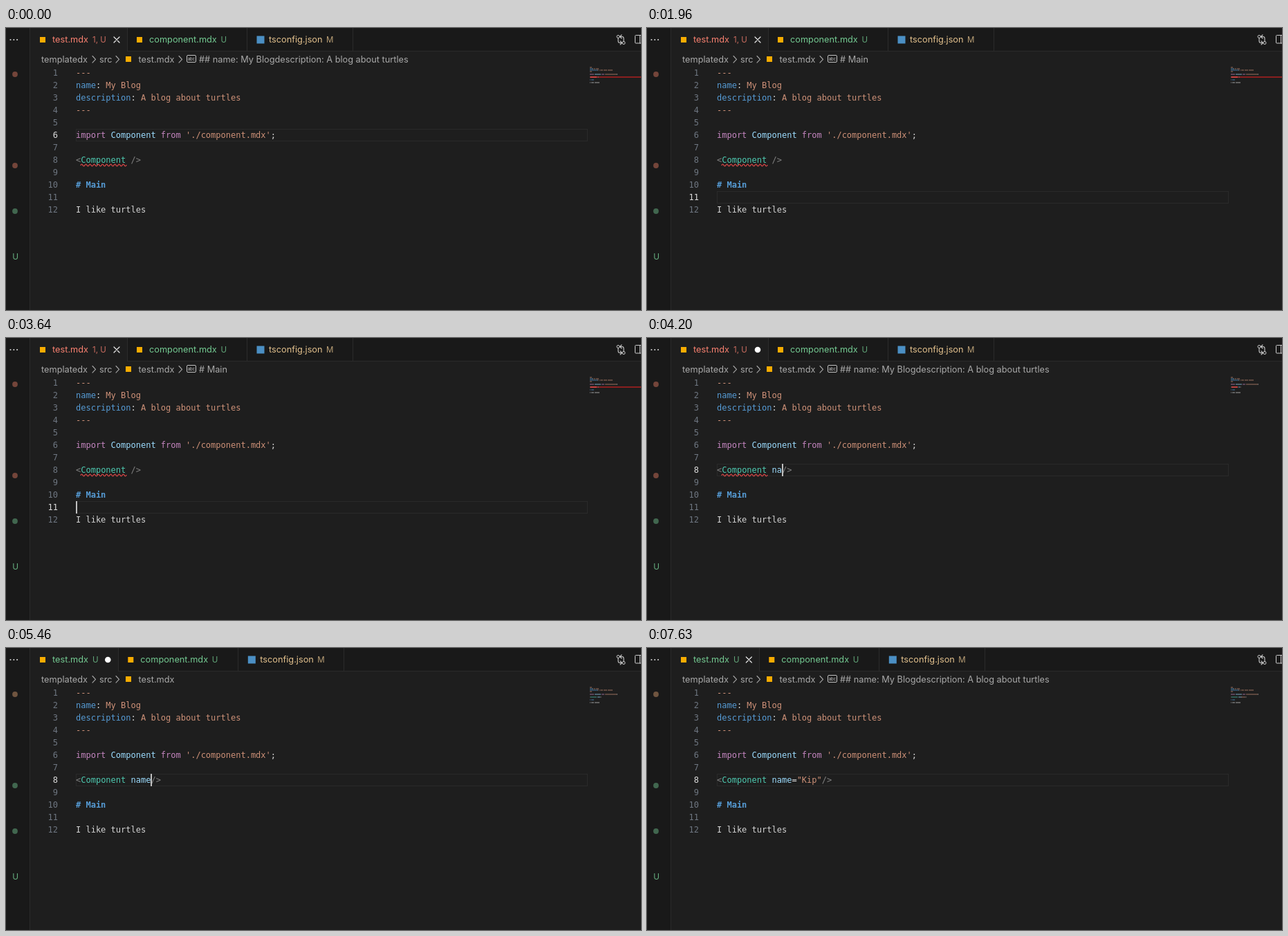
Write an HTML page that moves like this. It is 918x408 px and loops after 8000 ms.

```html
<!DOCTYPE html>
<html lang="en">
<head>
<meta charset="utf-8">
<title>Editor type checking</title>
<style>
  html, body { margin: 0; width: 100%; height: 100%; overflow: hidden; background: #1e1e1e; }
  svg { display: block; width: 918px; height: 408px; }
  text { white-space: pre; font-variant-ligatures: none; }
  .mono { font: 12px "DejaVu Sans Mono", monospace; }
  .ui { font: 12.75px Inter, sans-serif; }
  .small { font: 11.85px Inter, sans-serif; }
  .badge { font: 11.5px Inter, sans-serif; opacity: .8; }
  .line { fill: none; stroke-linecap: round; stroke-linejoin: round; }
</style>
</head>
<body>
<svg id="stage" viewBox="0 0 918 408"></svg>
<script>
const LOOP = 8000, CW = 7.224, LEFT = 101, TOP = 56, ROW = 18;
const C = {
  fg: '#d4d4d4', dim: '#808080', blue: '#569cd6', sky: '#9cdcfe', pink: '#c586c0',
  str: '#ce9178', type: '#4ec9b0', bad: '#f44747', err: '#f88070', add: '#73c991',
  mod: '#e2c08d', crumb: '#a9a9a9', link: '#4daafc', edge: '#2b2b2b', bg: '#1e1e1e', side: '#191919'
};
const FRONT = '## name: My Blogdescription: A blog about turtles';

// Each step patches the editor state at its time in ms.
const STEPS = [
  [0, { row: 6, caret: false, attr: '', mode: 'md', crumb: FRONT, errors: 1, mark: 'tag',
        dirty: false, hoverTab: false, popup: 0 }],
  [420, { row: 11, caret: true }],
  [560, { crumb: '# Main' }],
  [980, { caret: false }],
  [1050, { hoverTab: true }],
  [1470, { caret: true }],
  [1610, { hoverTab: false }],
  [1960, { caret: false }],
  [2450, { caret: true, popup: .45 }],
  [2520, { popup: .94 }],
  [2590, { popup: 1 }],
  [3080, { caret: false }],
  [3570, { caret: true, popup: 0 }],
  [3780, { row: 8 }],
  [3920, { crumb: FRONT }],
  [4130, { attr: 'n', dirty: true }],
  [4200, { attr: 'na' }],
  [4340, { attr: 'nam' }],
  [4410, { attr: 'name' }],
  [4620, { attr: 'name-' }],
  [4900, { attr: 'name-"', mode: 'attr', mark: 'quote' }],
  [5040, { errors: 2 }],
  [5250, { attr: 'name-', mode: 'md' }],
  [5320, { crumb: '', errors: 0, mark: '' }],
  [5390, { attr: 'name' }],
  [5600, { attr: 'name=', mode: 'attr' }],
  [5740, { errors: 1 }],
  [5950, { attr: 'name="', mode: 'str' }],
  [6020, { mark: 'end' }],
  [6370, { attr: 'name="K' }],
  [6580, { attr: 'name="Ki' }],
  [6790, { attr: 'name="Kip' }],
  [7070, { attr: 'name="Kip"', mode: 'md' }],
  [7210, { errors: 0, mark: '' }],
  [7420, { dirty: false }],
  [7490, { crumb: FRONT }],
  [7630, { caret: false }]
];
const states = [];
STEPS.reduce((s, [, patch]) => (states.push(s = { ...s, ...patch }), s), {});

const esc = s => s.replace(/&/g, '&amp;').replace(/</g, '&lt;');
const rect = (x, y, w, h, fill, more = '') =>
  `<rect x="${x}" y="${y}" width="${w}" height="${h}" fill="${fill}" ${more}/>`;
const circle = (x, y, r, fill, more = '') => `<circle cx="${x}" cy="${y}" r="${r}" fill="${fill}" ${more}/>`;
const path = (d, stroke, w = 1) => `<path class="line" d="${d}" stroke="${stroke}" stroke-width="${w}"/>`;
const text = (x, y, cls, fill, s, more = '') =>
  `<text x="${x}" y="${y}" class="${cls}" fill="${fill}" xml:space="preserve" ${more}>${esc(s)}</text>`;
// Runs alternate colour and text; a trailing * on the colour means bold.
function runs(x, y, list) {
  let out = '';
  for (let i = 0; i < list.length; i += 2) {
    const key = list[i].replace('*', ''), bold = key !== list[i];
    out += `<tspan fill="${C[key]}"${bold ? ' font-weight="700"' : ''}>${esc(list[i + 1])}</tspan>`;
  }
  return `<text x="${x}" y="${y}" class="mono" xml:space="preserve">${out}</text>`;
}
const cross = (x, y, c) => path(`M${x - 4} ${y - 4}l8 8m0 -8l-8 8`, c, 1.2);
const chevron = x => path(`M${x - 2} 40.5l4.5 4.8l-4.5 4.8`, C.crumb, 1.1);
const wave = (x, y, n) => path(`M${x} ${y}` + 'q1.5 -3 3 0t3 0'.repeat(n), '#f14c4c', 1.2);

function code({ attr, mode }) {
  const [, key, eq, val] = attr.match(/^([^="]*)(=?)(.*)$/);
  const tag = ['dim', '<', 'type', 'Component', 'fg', ' '];
  if (mode === 'attr') tag.push('bad', attr + '/>');
  else tag.push('sky', key, 'fg', eq, 'str', val, mode === 'str' ? 'str' : 'dim', '/>');
  const main = { md: ['blue*', '# Main'], attr: ['bad', '#', 'sky', ' Main'], str: ['str', '# Main'] }[mode];
  const body = { md: 'fg', attr: 'sky', str: 'str' }[mode];
  return [
    ['str', '---'],
    ['blue', 'name', 'fg', ': ', 'str', 'My Blog'],
    ['blue', 'description', 'fg', ': ', 'str', 'A blog about turtles'],
    ['str', '---'],
    [],
    ['pink', 'import', 'sky', ' Component ', 'pink', 'from ', 'str', "'./component.mdx'", 'fg', ';'],
    [], tag, [], main, [],
    [body, 'I like turtles']
  ];
}

function minimap(lines, s) {
  let out = '';
  const bar = s.mark === 'end' ? 12 : s.mark === 'tag' && s.row !== 8 ? 8 : 0;
  if (bar) out += rect(844, 54 + bar * 2, 74, 2, '#8a1f1f');
  lines.forEach((list, i) => {
    let col = 0;
    for (let k = 0; k < list.length; k += 2) {
      for (const m of list[k + 1].matchAll(/\S+/g))
        out += rect(844 + col + m.index, 56.4 + i * 2, m[0].length, 1.2, C[list[k].replace('*', '')], 'opacity=".6"');
      col += list[k + 1].length;
    }
  });
  if (s.mark === 'tag' || s.mark === 'quote') out += rect(845, 70, 9, 2, '#e03c3c', 'opacity=".8"');
  return out;
}

function editor(s) {
  const lines = code(s);
  const y = TOP + (s.row - 1) * ROW;
  let out = rect(101.5, y + .5, 739, ROW - 1, 'none', 'stroke="#2a2a2a"');
  if (s.popup) out += rect(108, 182, 65, ROW, '#264f78', 'opacity=".4"');
  lines.forEach((list, i) => {
    const base = TOP + i * ROW + 13, on = i + 1 === s.row;
    out += text(75, base, 'mono', on ? '#dcdcdc' : '#6e7681', String(i + 1), 'text-anchor="end"');
    if (list.length) out += runs(LEFT, base, list);
  });
  if (s.mark === 'tag' || s.mark === 'quote') out += wave(108, 198.5, 11);
  if (s.mark === 'quote') out += wave(213, 198.5, 1.5);
  if (s.mark === 'end') out += wave(205.5, 270.5, 1);
  if (s.caret) {
    const col = s.row === 8 ? 11 + s.attr.length : 0;
    out += rect(Math.round(LEFT + col * CW), y, 2, ROW, '#c0c0c0');
  }
  return out + minimap(lines, s);
}

function tabs(s) {
  const d = [-12.7, 0, 2][s.errors];
  const own = s.errors ? C.err : C.add;
  const end = 175.5 + d;
  let out = rect(35, 0, 883, 34, C.side) + rect(35, 0, end - 35, 34, C.bg);
  out += rect(end, 33, 918 - end, 1, C.edge);
  for (const x of [175, 348, 501]) out += rect(Math.round(x + d), 0, 1, 34, C.edge);
  const icon = x => rect(x, 13, 8, 8, '#f9ac00');
  out += icon(49) + text(67, 21.3, 'ui', own, 'test.mdx');
  out += text(125, 21.3, 'badge', own, s.errors ? s.errors + ', U' : 'U');
  out += s.dirty ? circle(160 + d, 17, 4.3, '#fff') : cross(160 + d, 17, '#e8e8e8');
  out += icon(189 + d) + text(207 + d, 21.3, 'ui', C.add, 'component.mdx');
  out += text(310.5 + d, 21.3, 'badge', C.add, 'U');
  if (s.hoverTab) out += cross(333 + d, 17, '#b0b0b0');
  out += rect(362.5 + d, 11.5, 11, 11, '#4b8fc4') + text(380 + d, 21.3, 'ui', C.mod, 'tsconfig.json');
  out += text(463 + d, 21.3, 'badge', C.mod, 'M');
  const ic = '#cccccc';
  out += circle(885, 12.5, 2, 'none', `stroke="${ic}"`) + circle(893, 21.5, 2, 'none', `stroke="${ic}"`);
  out += path('M885 14.5v4.5q0 2.5 2.5 2.5h2.5m-2 -2.5l2.5 2.5l-2.5 2.5M893 19.5v-4.5q0 -2.5 -2.5 -2.5h-2.5m2 -2.5l-2.5 2.5l2.5 2.5', ic, 1.1);
  out += rect(909.5, 10.5, 14, 11.5, 'none', `stroke="${ic}" rx="1"`) + path('M916.5 10.5v11.5', ic);
  return out;
}

function crumbs(s) {
  const t = (x, str) => text(x, 50, 'ui', C.crumb, str);
  let out = t(51, 'templatedx') + chevron(127) + t(135, 'src') + chevron(161);
  out += rect(173, 41, 8, 8, '#f9ac00') + t(191.5, 'test.mdx');
  if (s.crumb) {
    out += chevron(252) + rect(261.5, 39.5, 13, 10, 'none', 'stroke="#c0c0c0" rx="1.5"');
    out += `<text x="268" y="46.7" font-size="6" font-family="Inter, sans-serif" fill="#ccc" text-anchor="middle">abc</text>`;
    out += t(279, s.crumb);
  }
  return out;
}

function sidebar(s) {
  let out = rect(0, 0, 34, 408, C.side) + rect(34, 0, 1, 408, C.edge);
  for (const x of [6.5, 11.3, 16.1]) out += circle(x, 17, 1.1, '#ccc');
  const red = '#74453a', green = '#41674f';
  const dots = [[67, s.errors ? red : '#705540'], [199, s.errors ? red : green], [265, green]];
  for (const [y, c] of dots) out += circle(13, y, 3.9, c);
  return out + text(9.2, 335.4, 'small', C.add, 'U', 'font-weight="600" opacity=".85"');
}

function popup(alpha) {
  if (!alpha) return '';
  const X = 117, sans = (x, y, str, c = '#cccccc', more = '') => text(x, y, 'small', c, str, more);
  const out = [
    rect(108.5, 200.5, 749, 220, '#202020', 'stroke="#454545" rx="3"'),
    rect(109, 271, 748, 1, '#3c3c3c'), rect(109, 386, 748, 1, '#3c3c3c'),
    runs(X, 218, ['fg', "Property 'name' is missing in type '{}' but required in type '{ readonly name: string; readonly"]),
    runs(X, 236, ['fg', "components?: {} | undefined; }'. ", 'dim', 'ts-plugin(2741)']),
    runs(X, 262, ['link', 'component.mdx(3, 3):', 'fg', " 'name' is declared here."]),
    runs(X, 289, ['fg', '(alias) ', 'blue', 'function ', 'sky', 'Component', 'fg', '(', 'sky', 'props', 'fg', ': { ',
      'blue', 'readonly ', 'fg', '[', 'type', 'K ', 'blue', 'in keyof ', 'type', 'MDXContentProps', 'fg', ']: ',
      'type', 'MDXContentProps', 'fg', '[', 'type', 'K', 'fg', ']; }):']),
    runs(X, 307, ['type', 'any']),
    runs(X, 325, ['pink', 'import', 'sky', ' Component']),
    sans(X, 352, 'Render the MDX contents.'),
    sans(X, 378, '@param', '#cccccc', 'font-style="italic"'),
    rect(168, 366, 44, 15, '#333333', 'rx="3"'),
    runs(172, 378, ['fg', 'props']),
    sans(216, 378, '— The'), sans(254.5, 378, 'props', C.link),
    sans(291, 378, 'that have been passed to the MDX component.'),
    sans(X, 402.5, 'View Problem (⌥F8)', C.link), sans(249, 402.5, 'Quick Fix... (⌘.)', C.link)
  ];
  return `<g opacity="${alpha}">${out.join('')}</g>`;
}

const stage = document.getElementById('stage');
let shown = -1;
function tick() {
  const t = performance.now() % LOOP;
  const at = STEPS.findLastIndex(step => step[0] <= t);
  if (at !== shown) {
    shown = at;
    const s = states[at];
    stage.innerHTML = rect(0, 0, 918, 408, C.bg) + tabs(s) + crumbs(s) + sidebar(s) + editor(s) + popup(s.popup);
  }
  requestAnimationFrame(tick);
}
tick();
</script>
</body>
</html>
```
